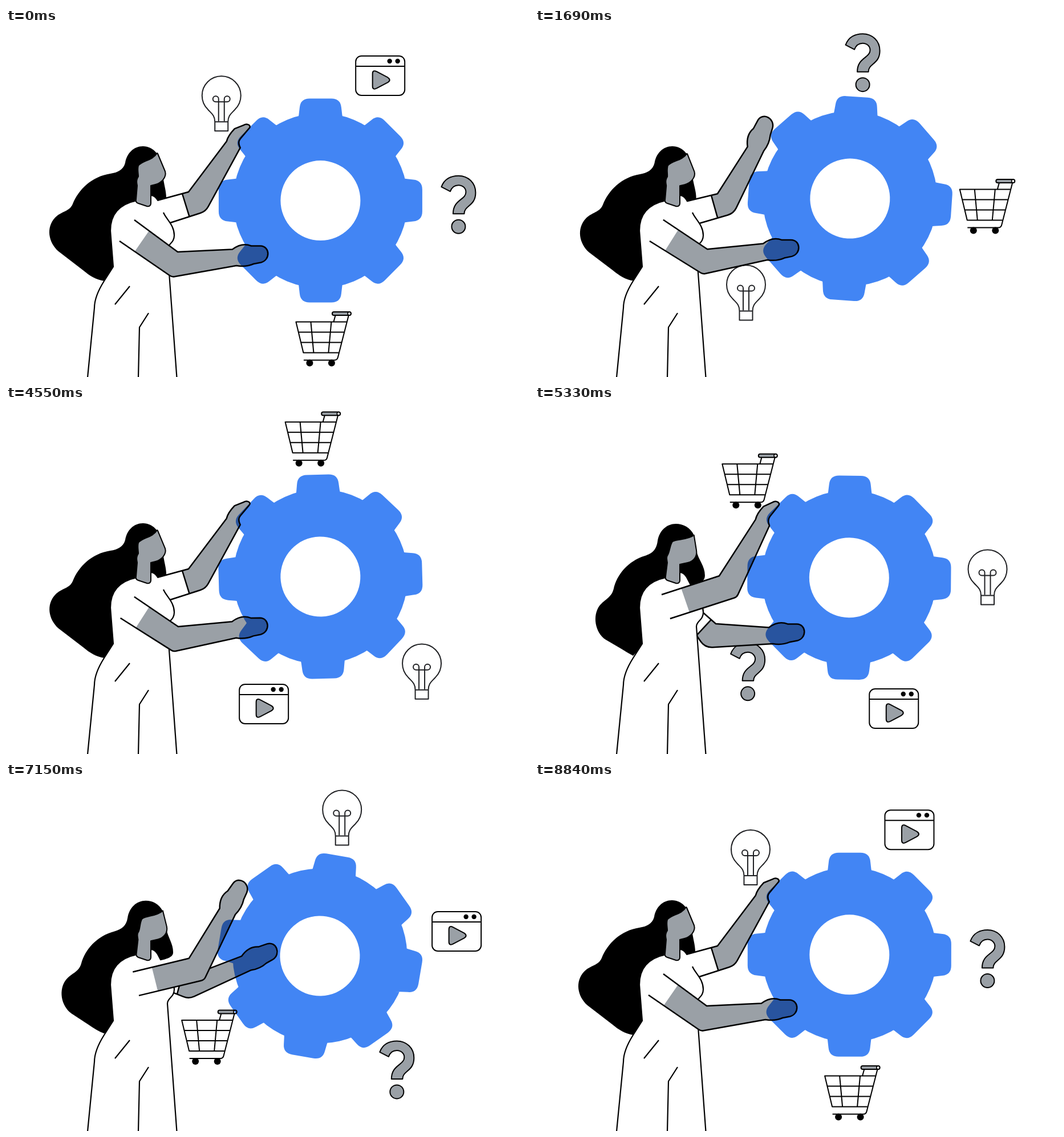
Write an HTML page with a canvas that moves like this. It is 917 px wide and 611 px high and loops after 8.97 s.

```html
<!DOCTYPE html>
<html lang="en">
<head>
<meta charset="utf-8">
<title>Turning the gear</title>
<style>
  html, body { margin: 0; height: 100%; overflow: hidden; background: #fff; }
  canvas { display: block; width: 100vw; height: 100vh; }
</style>
</head>
<body>
<canvas id="stage" width="917" height="611"></canvas>
<script>
const ctx = document.getElementById('stage').getContext('2d');
const LOOP = 8970, STEP = 130, PUSHES = 8, PUSH = LOOP / PUSHES;
const BLUE = '#4285f4', GRAY = '#9aa0a6', BLACK = '#000', WHITE = '#fff', INK = '#202124';
const ORBIT = { x: 551, y: 302, radius: 242.5 };

const mix = (a, b, k) => a + (b - a) * k;
const clamp = v => Math.max(0, Math.min(1, v));
const rad = deg => deg * Math.PI / 180;

// S-curve over 0..1: a higher gain moves it earlier, a higher power makes it steeper.
function ease(t, gain, power) {
  const odds = gain * (t / (1 - t)) ** power;
  return odds / (1 + odds);
}

function smoothstep(from, to, t) {
  const s = clamp((t - from) / (to - from));
  return s * s * (3 - 2 * s);
}

function paint(path, fill, stroke, width = 2.2) {
  ctx.lineWidth = width;
  if (fill) { ctx.fillStyle = fill; ctx.fill(path); }
  if (stroke) { ctx.strokeStyle = stroke; ctx.stroke(path); }
}

function dot(x, y, r, fill, stroke, width) {
  const path = new Path2D();
  path.arc(x, y, r, 0, 2 * Math.PI);
  paint(path, fill, stroke, width);
}

function pill(x, y, w, h, r, fill) {
  const path = new Path2D();
  path.roundRect(x, y, w, h, r);
  paint(path, fill, BLACK, 2);
}

// Each joint is [lowered, raised] and the arm blends between both.
const NEAR_ARM = {
  shoulderTop: [[225, 336], [222, 332]], shoulderBottom: [[199, 373], [237, 374]],
  elbowTop: [[301, 392], [323, 299]], elbowBottom: [[291, 436], [354, 336]],
  wrist: [[400, 401], [400, 206]],
  cuffTop: .34, cuffBottom: .29, elbowRadius: 11,
};
const FAR_ARM = {
  shoulderTop: [[276, 347], [265, 302]], shoulderBottom: [[266, 378], [288, 341]],
  elbowTop: [[317, 383], [320, 287]], elbowBottom: [[298, 425], [350, 321]],
  wrist: [[413, 403], [399, 205]],
  cuffTop: .8, cuffBottom: .54, elbowRadius: 24, cuffLine: true,
};

// A rising hand stays open and grips late; a pulling hand lets go early and swings forward.
function handMotion(rising, t) {
  if (rising) return { reach: ease(t, 27, 2.3), grip: smoothstep(.5, .8, t), forward: 0 };
  const reach = 1 - ease(t, 16, 5);
  return { reach, grip: 1 - smoothstep(.05, .35, t), forward: 80 * reach * (1 - reach) };
}

// Continues the current path around the mitten, in wrist coordinates.
function traceHand([x, y], angle, grip) {
  const curl = (open, gripped) => mix(open, gripped, grip);
  ctx.save();
  ctx.translate(x, y);
  ctx.rotate(rad(angle));
  ctx.lineTo(-3, -13.5);
  ctx.quadraticCurveTo(curl(14, 6), curl(-26, -18), curl(30, 23), curl(-19.5, -17));
  ctx.lineTo(curl(46, 38), curl(-19.5, -9));
  ctx.bezierCurveTo(curl(63, 46), curl(-19, -6), curl(64, 46), curl(5, 3), curl(47, 40), curl(9.5, 2));
  ctx.lineTo(curl(34, 16), curl(12, 2));
  ctx.quadraticCurveTo(curl(20, 8), curl(18, 2), 4, curl(15, 12));
  ctx.restore();
}

function drawArm(arm, { reach, grip, forward }) {
  const between = (a, b, k) => [mix(a[0], b[0], k), mix(a[1], b[1], k)];
  const joint = name => between(...arm[name], reach);
  const top = joint('shoulderTop'), bottom = joint('shoulderBottom');
  const elbowTop = joint('elbowTop'), elbowBottom = joint('elbowBottom');
  const wrist = joint('wrist');
  wrist[0] += forward - 14 * reach * (1 - grip);
  const angle = -65 * reach ** 1.5 + 15 * reach * grip;
  const trace = (from, to) => {
    ctx.beginPath();
    ctx.moveTo(...from);
    ctx.lineTo(...elbowTop);
    traceHand(wrist, angle, grip);
    ctx.arcTo(...elbowBottom, ...to, arm.elbowRadius);
    ctx.lineTo(...to);
  };
  const cuffTop = between(top, elbowTop, arm.cuffTop);
  const cuffBottom = between(bottom, elbowBottom, arm.cuffBottom);

  trace(top, bottom);
  ctx.fillStyle = WHITE;
  ctx.fill();
  trace(cuffTop, cuffBottom);
  ctx.fillStyle = GRAY;
  ctx.fill();
  trace(top, bottom);
  if (arm.cuffLine) {
    ctx.moveTo(...cuffTop);
    ctx.lineTo(...cuffBottom);
  }
  ctx.strokeStyle = BLACK;
  ctx.lineWidth = 2.5;
  ctx.stroke();
}

// Blends two path strings that share the same commands.
function morph([from, to], k) {
  const number = /-?\d+(\.\d+)?/g, ends = to.match(number);
  let i = 0;
  return new Path2D(from.replace(number, n => mix(+n, +ends[i++], k)));
}

const HAIR = [
  'M264,219C258,211 249,207 240,207C224,207 212,219 209,236C206,248 196,253 183,255C150,260 127,283 117,308C111,322 98,320 86,332C70,349 74,375 92,391L135,424C147,434 158,441 173,443L195,415L240,300L232,262Z',
  'M279,228C272,214 260,208 247,208C231,208 218,220 215,238C213,254 205,260 193,264C163,273 143,298 138,322C134,338 122,340 113,352C101,369 105,398 124,411L150,426C158,431 165,435 172,439L195,415L240,300L234,262Z'];
const LOCK = [
  'M250,270L275,258C277,275 281,285 281,298C281,299 275,301 265,302L250,302Z',
  'M250,270L283,255C287,272 298,282 298,298C298,306 295,312 270,317L250,302Z'];
const FACE = [
  'M265,219C256,233 240,231 232,241C230,248 232,254 232,260C228,266 229,270 230,276L228,300C227,304 229,306 232,307L247,312C251,313 254,311 254,307L254,276L262,274C273,271 282,261 279,251L266,220Z',
  'M279,228C266,237 250,234 241,239C236,247 237,254 233,262C230,266 231,270 232,276L229,300C228,304 230,306 232,307L247,312C251,313 254,311 254,307L254,279L268,276C278,274 285,265 283,254L279,229Z'];
const LEFT_SIDE = 'M230,302C200,308 183,325 183,355L188,418L172,443C160,462 155,478 155,490L143,612';
const TORSO = new Path2D(LEFT_SIDE + 'H299L283,388C283,378 295,377 295,363C295,345 281,335 276,323L265,302C262,297 258,294 254,294Z');
const SEAMS = new Path2D(LEFT_SIDE + 'M276,323C281,335 295,345 295,363C295,377 283,378 283,388L299.5,612M217,452L191,484M250,499L234,524L232,612');

function drawWoman(nearRises, t) {
  const lean = ease(t, 8.6, 2.5), turned = nearRises ? lean : 1 - lean;
  paint(morph(HAIR, turned), BLACK);
  paint(morph(LOCK, turned), BLACK);
  drawArm(FAR_ARM, handMotion(!nearRises, t));
  paint(TORSO, WHITE);
  paint(SEAMS, null, BLACK);
  paint(morph(FACE, turned), GRAY, BLACK, 2);
  drawArm(NEAR_ARM, handMotion(nearRises, t));
}

const TOOTH = new Path2D('M-40,-140L-38,-150L-36.5,-163Q-35,-178.5 -19,-178.5H19Q35,-178.5 36.5,-163L38,-150L40,-140Z');
const GEAR = new Path2D();
for (let i = 0; i < 8; i++) GEAR.addPath(TOOTH, new DOMMatrix().rotate(i * 45));
GEAR.arc(0, 0, 153, 0, 2 * Math.PI);
const OUTSIDE_HOLE = new Path2D('M-200,-200H200V200H-200ZM70,0A70,70 0 1 1 -70,0A70,70 0 1 1 70,0Z');

// Multiplied over the arms so overlapping skin turns dark blue.
function drawGear(turn, t) {
  const wave = 2 * Math.PI * t / LOOP;
  ctx.save();
  ctx.translate(551.4 + Math.sin(wave), 301.2 - 3.3 * Math.sin(wave - .26));
  ctx.rotate(-rad(turn));
  ctx.clip(OUTSIDE_HOLE, 'evenodd');
  ctx.globalCompositeOperation = 'multiply';
  paint(GEAR, BLUE);
  ctx.restore();
}

function drawBulb() {
  paint(new Path2D('M-11.5,32C-11.5,20 -18,17 -24,10A34,34 0 1 1 24,10C18,17 11.5,20 11.5,32V48H-11.5V32H11.5'), WHITE, INK, 2);
  paint(new Path2D('M-10,-3a5,5 0 1 1 5,-5V31M10,-3a5,5 0 1 0 -5,-5V31M-10,-3H10'), null, INK, 2);
}

function drawPlayer() {
  pill(-43, -34.5, 86, 69, 10, WHITE);
  paint(new Path2D('M-43,-16.5H43'), null, BLACK, 2);
  dot(16.5, -25.5, 4.2, BLACK);
  dot(30.5, -25.5, 4.2, BLACK);
  paint(new Path2D('M-13.5,-3Q-13.5,-11 -6,-7L13,3Q20,7.5 13,12L-6,22Q-13.5,26 -13.5,18Z'), GRAY, BLACK, 2);
}

function drawQuestion() {
  paint(new Path2D('M-30,-31C-25,-45 -13,-50.5 0,-50.5C17,-50.5 30,-38 30,-21C30,3 10,1 10,16H-9.5C-9.5,-9 13,-8 13,-22C13,-29 7,-34 0,-34C-7,-34 -12,-30 -14.5,-23Z'), GRAY, BLACK, 2);
  dot(0, 38.5, 12, GRAY, BLACK, 2);
}

function drawCart() {
  paint(new Path2D('M40,-30H-48.5L-35.5,24H26M44,-42L25,32Q24,37 19,37H-35M-22.5,-30L-17.5,24M13.5,-30L8.5,24M-44.5,-12H37M-40,6H32M20.5,-41L17.5,-30'), null, BLACK, 2);
  dot(-24.5, 42, 6, BLACK);
  dot(14, 42, 6, BLACK);
  pill(15, -47.5, 33, 6, 3, GRAY);
  dot(45, -44.5, 2.8, WHITE, BLACK, 1.6);
}

const ICONS = [
  { draw: drawBulb, angle: 135.6 },
  { draw: drawPlayer, angle: 64.3 },
  { draw: drawQuestion, angle: -1.7 },
  { draw: drawCart, angle: 271.4 },
];

function drawIcon({ draw, angle }, turn) {
  const at = (angle + turn + 360) % 360;
  // Icons are out of sight while they pass behind the woman.
  const alpha = at < 175 ? clamp((147 - at) / 10) : clamp((at - 201) / 13);
  if (!alpha) return;
  ctx.save();
  ctx.globalAlpha = alpha;
  ctx.translate(ORBIT.x + ORBIT.radius * Math.cos(rad(at)), ORBIT.y - ORBIT.radius * Math.sin(rad(at)));
  draw();
  ctx.restore();
}

function render(t) {
  const push = Math.floor(t / PUSH), phase = t / PUSH - push;
  const turn = (push + ease(phase, 10, 2)) * 360 / PUSHES;
  ctx.fillStyle = WHITE;
  ctx.fillRect(0, 0, 917, 611);
  ctx.lineJoin = 'round';
  ICONS.forEach(icon => drawIcon(icon, turn));
  drawWoman(push % 2 === 0, phase);
  drawGear(turn, t);
}

function tick() {
  const t = performance.now() % LOOP;
  render(Math.floor(t / STEP) * STEP);
  requestAnimationFrame(tick);
}
tick();
</script>
</body>
</html>
```
